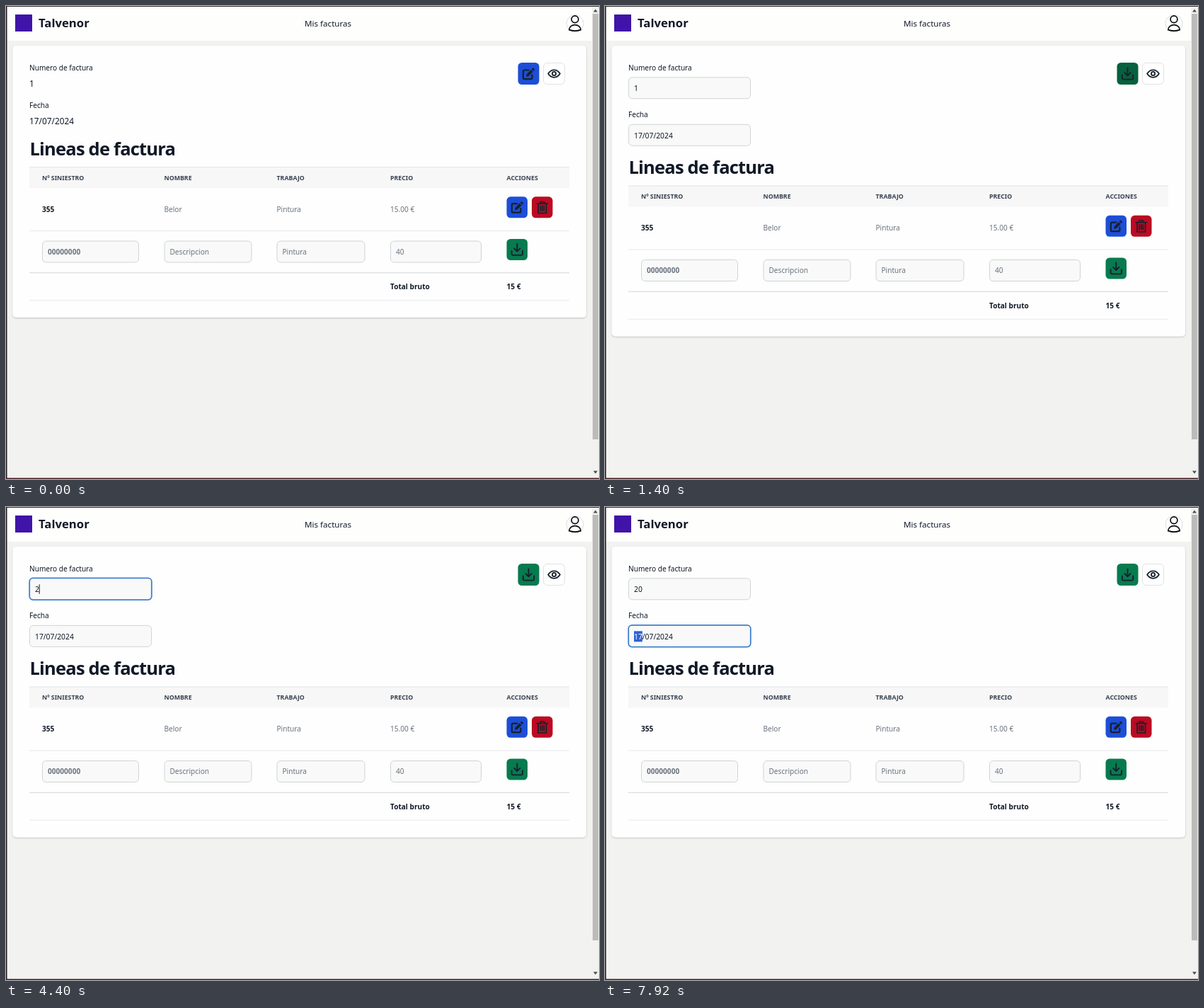
Write an HTML page that moves like this. It is 838 by 668 pixels and loops after 8000 ms.

```html
<!DOCTYPE html>
<html lang="es">
<head>
<meta charset="utf-8">
<title>Factura</title>
<style>
  html, body { margin: 0; width: 100%; height: 100%; overflow: hidden; background: #f2f3f1; }
  svg { display: block; width: 838px; height: 668px; font: 10.1px "Noto Sans", "Open Sans", sans-serif; }
  text { fill: #111827; white-space: pre; }
  .medium { font-weight: 500; }
  .semi { font-weight: 600; }
  .bold { font-weight: 700; }
  .muted { fill: #6b7280; }
  .head { font-size: 8.8px; font-weight: 700; fill: #374151; }
  .big { font-size: 11.85px; }
  .field { fill: #f8f9f8; stroke: #d1d5d5; }
  .icon { fill: none; stroke: #17212b; stroke-linejoin: round; stroke-linecap: round; }
  .solid { fill: #17212b; stroke: none; }
</style>
</head>
<body>
<svg viewBox="0 0 838 668">
  <defs>
    <filter id="shadow" x="-5%" y="-5%" width="110%" height="112%">
      <feDropShadow dx="0" dy="1" stdDeviation="1.3" flood-opacity=".22"/>
    </filter>
    <g id="pencil" class="icon" stroke-width="2">
      <path d="M8 3.2H2.6A1.4 1.4 0 0 0 1.2 4.6V13.2A1.4 1.4 0 0 0 2.6 14.6H11.2A1.4 1.4 0 0 0 12.6 13.2V9.5"/>
      <path class="solid" d="M13 .9a1 1 0 0 1 1.4 0l1.2 1.2a1 1 0 0 1 0 1.4l-1 1-2.6-2.6zM11.2 2.7l2.6 2.6-5.8 5.8-3 .5.5-3z"/>
    </g>
    <path id="tray" class="icon" stroke-width="1.7" d="M8 .5V10M4.2 6.4 8 10.2l3.8-3.8M1 9.5v4.2a1.4 1.4 0 0 0 1.4 1.4h11.2a1.4 1.4 0 0 0 1.4-1.4V9.5"/>
    <path id="trash" class="icon" stroke-width="1.5" d="M1.2 3.2H14.8M5.4 3V.8H10.6V3M2.8 3.4V15.4H13.2V3.4M5.7 6.2v6.2M8 6.2v6.2M10.3 6.2v6.2"/>
    <g id="eye" class="icon" stroke-width="1.6">
      <path d="M.6 8C4.2 1.8 11.8 1.8 15.4 8 11.8 14.2 4.2 14.2.6 8Z"/>
      <circle cx="8" cy="8" r="2.3"/>
    </g>
  </defs>

  <rect width="838" height="668" fill="#f2f3f1"/>
  <rect width="828" height="49" fill="#fefefd"/>
  <rect x="13" y="12" width="24" height="24" fill="#4014a8"/>
  <text class="bold" x="46" y="30" font-size="16.7">Talvenor</text>
  <text class="medium" x="422" y="28.5" font-size="11.6">Mis facturas</text>
  <circle cx="804" cy="24.5" r="12" fill="#fff" stroke="#dcdedf"/>
  <g fill="none" stroke="#080a0c" stroke-width="1.7">
    <circle cx="804" cy="18.8" r="4.9"/>
    <path d="M795.8 33.6C796.2 24.2 811.8 24.2 812.2 33.6Q804 36.6 795.8 33.6Z"/>
  </g>

  <rect id="card" x="9.5" y="56" width="810.5" rx="5" fill="#fdfefd" filter="url(#shadow)"/>
  <text class="medium" x="33" y="91">Numero de factura</text>

  <g id="view">
    <text class="big" x="33" y="113.5">1</text>
    <text class="medium" x="33" y="144">Fecha</text>
    <text class="big" x="33" y="166.5">17/07/2024</text>
  </g>
  <g id="edit">
    <text class="medium" x="33" y="157">Fecha</text>
    <g id="number"></g>
    <g id="date"></g>
  </g>

  <rect id="ring" x="722.5" y="78.5" width="32" height="33" rx="7" fill="none" stroke="#a9cbfa" stroke-width="3.4"/>
  <rect id="main" x="723.5" y="80" width="30" height="31" rx="5.5"/>
  <use id="mainPencil" href="#pencil" transform="translate(729.6 87) scale(1.1)"/>
  <use id="mainTray" href="#tray" transform="translate(729.7 87) scale(1.1)"/>
  <rect x="759.5" y="80.5" width="30" height="30" rx="5.5" fill="#fff" stroke="#dfe2e5"/>
  <use href="#eye" transform="translate(765.5 86.5) scale(1.13)"/>

  <g id="table"></g>

  <rect x="828" width="10" height="668" fill="#f1f2f0"/>
  <rect x="829" y="11" width="8" height="601" fill="#bbbcba"/>
  <path d="M830 8.5l3-4 3 4zM830 656.5l3 4 3-4z" fill="#4b4d4c"/>
  <path d="M0 .5H838" stroke="#34302f"/>
  <path d="M.75 0V668" stroke="#281a22" stroke-width="1.5"/>
  <path d="M0 667.2H838" stroke="#4a2024" stroke-width="1.6"/>
</svg>
<script>
const LOOP = 8000;
const BLUE = [29, 78, 216], BLUE_HOVER = [30, 64, 160];
const GREEN = '#087a50', GREEN_HOVER = '#07603f', RED = '#bb0b23';
const $ = id => document.getElementById(id);
const rgb = c => `rgb(${c})`;
const mix = (a, b, k) => a.map((v, i) => Math.round(v + (b[i] - v) * k));
const show = (id, on) => $(id).setAttribute('display', on ? 'inline' : 'none');

const text = (x, y, str, cls = '') => `<text x="${x}" y="${y}" class="${cls}">${str}</text>`;
const field = (x, y, w) => `<rect class="field" x="${x + .5}" y="${y}" width="${w - 1}" height="30" rx="5"/>`;
const line = (y, color) => `<path d="M33 ${y}H796" stroke="${color}"/>`;
const button = (x, y, color, icon) =>
  `<rect x="${x}" y="${y}" width="29.5" height="30" rx="5.5" fill="${color}"/>` +
  `<use href="#${icon}" transform="translate(${x + 6} ${y + 6.3}) scale(1.1)"/>`;

function buildTable() {
  const columns = [51, 223.5, 382.5, 543, 707.5];
  const titles = ['Nº SINIESTRO', 'NOMBRE', 'TRABAJO', 'PRECIO', 'ACCIONES'];
  const values = ['355', 'Belor', 'Pintura', '15.00 €'];
  const hints = ['00000000', 'Descripcion', 'Pintura', '40'];
  const widths = [137, 124, 125, 129];
  $('table').innerHTML =
    '<text class="bold" x="33.5" y="210.5" font-size="25.5" letter-spacing="-.8">Lineas de factura</text>' +
    '<rect x="33" y="227" width="763" height="30" fill="#f6f7f6"/>' +
    line(227.5, '#e3e6e8') + line(317.5, '#e6e8eb') + line(376.8, '#d3d6da') + line(415.8, '#e6e8eb') +
    titles.map((s, i) => text(columns[i], 245.7, s, 'head')).join('') +
    values.map((s, i) => text(columns[i], 290.8, s, i ? 'muted' : 'semi')).join('') +
    hints.map((s, i) => field(columns[i], 332, widths[i]) +
      text(columns[i] + 8, 350.6, s, i ? 'muted' : 'muted semi')).join('') +
    button(707.5, 269.3, rgb(BLUE), 'pencil') +
    button(743, 269.3, RED, 'trash') +
    button(707.5, 329, GREEN, 'tray') +
    text(543, 400, 'Total bruto', 'semi') + text(707.5, 400, '15 €', 'semi');
}

// select is a [from, to) character range; caret is a character index or -1.
function drawInput(id, y, { value, focus, caret = -1, select }) {
  const digit = 5.9, left = 41;
  const frame = focus
    ? `<rect x="33.2" y="${y}" width="172.6" height="30.8" rx="5" fill="#f8f9f8" stroke="#3f7fd0" stroke-width="1.8"/>`
    : field(33, y + .5, 173);
  let mark = '', str = value;
  if (select) {
    const [from, to] = select;
    mark = `<rect x="${left + from * digit}" y="${y + 8.5}" width="${(to - from) * digit}" height="15" fill="#2f62d6"/>`;
    str = `${value.slice(0, from)}<tspan fill="#fff">${value.slice(from, to)}</tspan>${value.slice(to)}`;
  }
  if (caret >= 0) {
    const x = left + caret * digit + .3;
    mark += `<path d="M${x} ${y + 9}v13.5" stroke="#111827"/>`;
  }
  $(id).innerHTML = frame + mark + `<text x="${left}" y="${y + 19.8}" font-size="10.3">${str}</text>`;
}

function numberState(t) {
  if (t < 2530) return { value: '1' };
  if (t < 3110) return { value: '1', focus: true, caret: t < 2570 ? -1 : 1 };
  if (t < 4400) return { value: '1', focus: true, select: [0, 1] };
  if (t < 5020) return { value: '2', focus: true, caret: 1 };
  if (t < 6240) return { value: '20', focus: true, caret: t < 5630 ? 2 : -1 };
  return { value: '20' };
}

function dateState(t) {
  const value = '17/07/2024';
  if (t < 6240) return { value };
  if (t < 7740) return { value, focus: true, caret: t < 6790 || t >= 7380 ? 2 : -1 };
  return { value, focus: true, select: [t < 7920 ? 1 : 0, 2] };
}

function render(t) {
  const editing = t >= 1400;
  const shift = editing ? 26.5 : 0;
  const hover = Math.min(1, Math.max(0, (t - 720) / 160));
  show('view', !editing);
  show('edit', editing);
  show('mainPencil', !editing);
  show('mainTray', editing);
  show('ring', t >= 1350 && !editing);
  $('main').setAttribute('fill', editing
    ? (t < 1760 ? GREEN_HOVER : GREEN)
    : rgb(mix(BLUE, BLUE_HOVER, t < 760 ? 0 : hover)));
  $('card').setAttribute('height', 384 + shift);
  $('table').setAttribute('transform', `translate(0 ${shift})`);
  drawInput('number', 100.3, numberState(t));
  drawInput('date', 166.8, dateState(t));
}

buildTable();
const start = performance.now();
function tick() {
  render((performance.now() - start) % LOOP);
  requestAnimationFrame(tick);
}
tick();
</script>
</body>
</html>
```
